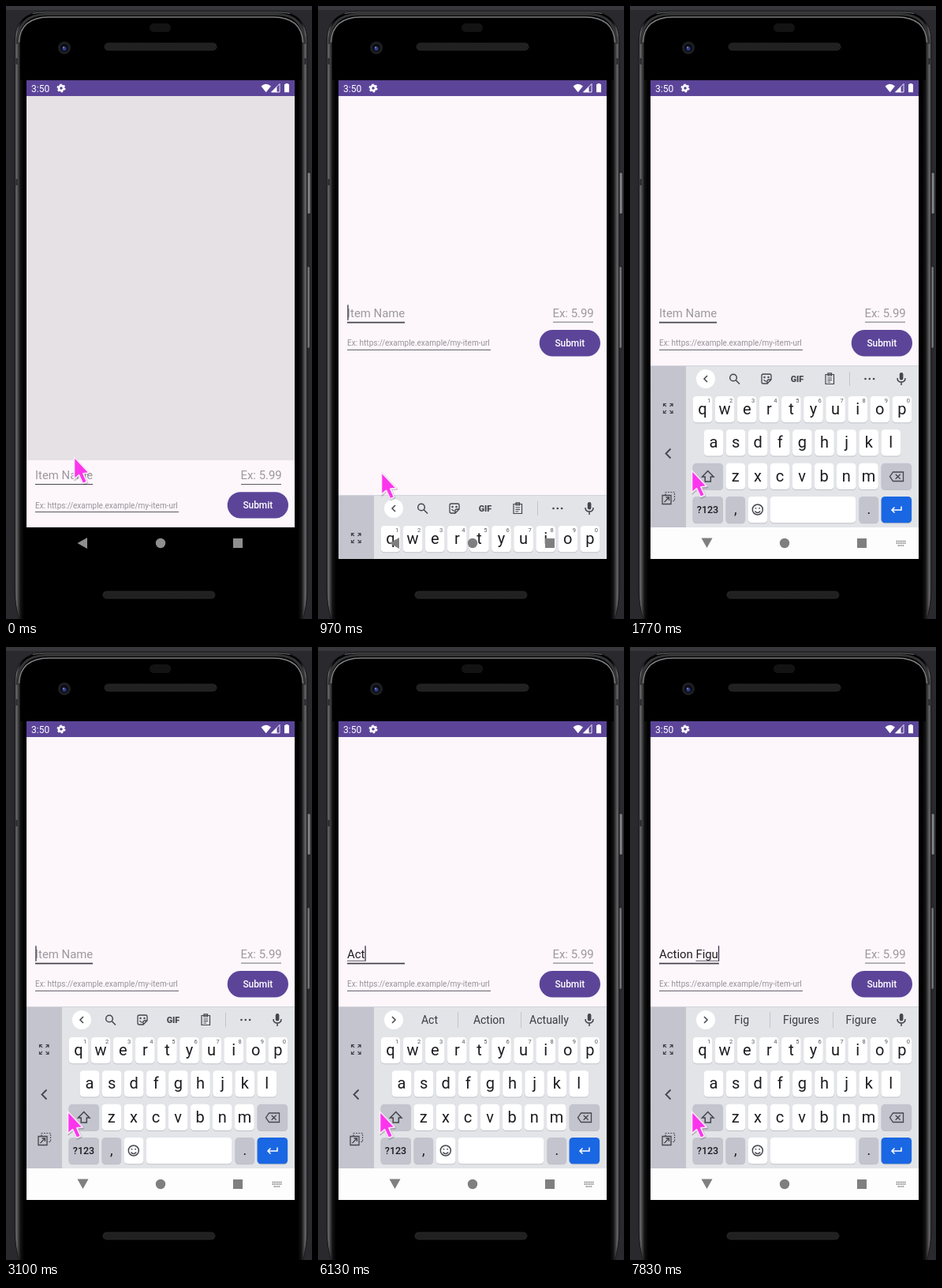
These frames come from a looping animation (388x776 px, 8000 ms). An HTML page:

```html
<!DOCTYPE html>
<html lang="en">
<head>
<meta charset="utf-8">
<title>Item form</title>
<style>
html, body { margin: 0; width: 100%; height: 100%; overflow: hidden; background: #29292e; }
svg { display: block; width: 388px; height: 776px; }
text { font-family: Roboto, sans-serif; white-space: pre; }
.line { fill: none; stroke: #44464c; stroke-width: 1.5; }
.mid { text-anchor: middle; }
</style>
</head>
<body>
<svg viewBox="0 0 388 776">
  <defs>
    <clipPath id="screen"><rect x="26" y="94" width="340" height="606"/></clipPath>
    <linearGradient id="metal" gradientUnits="userSpaceOnUse" x1="11" x2="382" y1="0" y2="0">
      <stop offset="0" stop-color="#2a2a2c"/><stop offset=".006" stop-color="#67686a"/>
      <stop offset=".013" stop-color="#3a3a3c"/><stop offset=".02" stop-color="#121213"/>
      <stop offset=".032" stop-color="#000"/><stop offset=".968" stop-color="#000"/>
      <stop offset=".98" stop-color="#121213"/><stop offset=".987" stop-color="#3a3a3c"/>
      <stop offset=".994" stop-color="#67686a"/><stop offset="1" stop-color="#2a2a2c"/>
    </linearGradient>
    <linearGradient id="button">
      <stop offset="0" stop-color="#3c3d3f"/><stop offset=".5" stop-color="#8d8e90"/><stop offset="1" stop-color="#4a4b4d"/>
    </linearGradient>
    <pattern id="mesh" width="4" height="4" patternUnits="userSpaceOnUse">
      <rect width="4" height="4" fill="#0e0e0e"/>
      <path d="M0 0L2 2L0 4M2 0L4 2L2 4" stroke="#3c3c3c" fill="none" stroke-width=".8"/>
    </pattern>
  </defs>

  <!-- phone -->
  <rect width="388" height="776" fill="#29292e"/>
  <rect width="388" height="5" fill="#37373c"/>
  <g fill="url(#button)" stroke="#1b1b1d" stroke-width=".6">
    <rect x="381" y="211" width="5.500" height="52" rx="1.500"/>
    <rect x="380" y="330" width="5.500" height="103" rx="1.500"/>
  </g>
  <path d="M11 738V44Q12 8 48 7H346Q381 8 382 44V738Q382 758 375 782H18Q11 758 11 738Z" fill="url(#metal)" stroke="#19191b"/>
  <path d="M18 50Q18 15 54 14H339Q375 15 375 50V94H18Z"/>
  <g fill="none">
    <path d="M14 48Q15 11 50 10.500H344Q378 11 379 48" stroke="#333436" stroke-width="3"/>
    <path d="M16.500 46Q18 14.500 54 14H339Q375 14.500 376.500 46" stroke="#808183" stroke-width="1.400"/>
    <path d="M34 9.500Q41 8 50 8H344Q353 8 360 9.500" stroke="#6c6d6f"/>
  </g>
  <path d="M11 66h4v8h-4zM11 219h4v8h-4zM378 66h4v8h-4z" fill="#303134"/>
  <rect x="182" y="22" width="27" height="11" rx="5.500" fill="#131314"/>
  <g fill="url(#mesh)" stroke="#2b2b2b" stroke-width=".8">
    <rect x="125" y="47" width="142" height="9" rx="4.500"/>
    <rect x="123" y="741" width="142" height="9" rx="4.500"/>
  </g>
  <circle cx="74" cy="53" r="8" fill="#1d1e22"/>
  <circle cx="74" cy="53" r="5" fill="#0c0d16"/>
  <circle cx="74" cy="54" r="2.500" fill="#2f3d86"/><circle cx="73" cy="52.500" r="1" fill="#8795d8"/>

  <g clip-path="url(#screen)">
    <rect x="26" y="94" width="340" height="606"/>
    <rect x="26" y="114" width="340" height="546" fill="#fdf7fc"/>
    <rect id="list" x="26" y="114" width="340" height="461" fill="#e6e1e5"/>
    <rect x="26" y="94" width="340" height="20" fill="#5c4599"/>
    <g fill="#fff">
      <text x="32" y="108.500" font-size="12">3:50</text>
      <circle cx="70" cy="104" r="3.100" fill="none" stroke="#fff" stroke-width="2.600"/>
      <circle cx="70" cy="104" r="4.600" fill="none" stroke="#fff" stroke-width="1.800" stroke-dasharray="2.400 2.417"/>
      <path d="M323.500 101.500Q329.700 96 336 101.500L329.700 109.300Z"/>
      <path d="M347 98.500V109H336.500Z" fill="none" stroke="#fff" stroke-width=".9"/><path d="M343.500 102V109H336.500Z"/>
      <path d="M354.500 99V98H357.500V99H359V109.300H353V99Z"/>
    </g>

    <!-- form -->
    <g id="form">
      <text id="name" x="37" y="599" font-size="14.900"></text>
      <text x="297.500" y="599" font-size="14.900" fill="#9c989e">Ex: 5.99</text>
      <text x="37" y="635.500" font-size="10.030" fill="#969298">Ex: https://example.example/my-item-url</text>
      <path id="nameLine" stroke="#49454f"/>
      <path id="priceLine" d="M298 605.500H349"/>
      <path d="M37 640.500H219" stroke="#5d5963"/>
      <path id="word" stroke="#3a373e" stroke-width=".8"/>
      <rect id="caret" y="583.500" width="1.300" height="19.500" fill="#37324a"/>
      <rect x="280.700" y="615.200" width="77.300" height="33.400" rx="16.700" fill="#5c4599"/>
      <text x="319.300" y="636.300" class="mid" font-size="11.900" font-weight="500" fill="#fff">Submit</text>
    </g>

    <!-- keyboard -->
    <g id="board">
      <rect x="26" y="455" width="340" height="205" fill="#e2e4e8"/>
      <rect x="26" y="455" width="45" height="205" fill="#c4c4cf"/>
      <rect x="26" y="660" width="340" height="40" fill="#fdfdfe"/>
      <path d="M26 455.500H366" stroke="#d3d4da"/>
      <g class="line">
        <path d="M42.500 507V503.500H46M50.500 503.500H54V507M42.500 512V515.500H46M50.500 515.500H54V512M43 504L46 507M53.500 504L50.500 507M43 515L46 512M53.500 515L50.500 512" stroke-width="1.200"/>
        <path d="M51.500 560.500L45.500 566.500L51.500 572.500" stroke-width="1.800"/>
        <path d="M41 619.500H52V630.500H41ZM43.500 628L49.500 622M45.500 622H49.500V626" stroke-width="1.300"/>
        <path d="M45 619V615.500H56.500V626.500H52" stroke-width="1.200" stroke-dasharray="1.800 1.500"/>
      </g>
      <circle cx="96" cy="472" r="12" fill="#fff"/>
      <path id="arrow" class="line" d="M98 468L94 472L98 476"/>
      <g id="tools" class="line">
        <circle cx="131" cy="470.500" r="4.300"/><path d="M134.200 473.700L139 478.500"/>
        <path d="M179 473V468Q179 466 177 466H169Q167 466 167 468V476Q167 478 169 478H174ZM179 473H176Q174 473 174 475V478M169.500 473Q171 475.500 173 475" stroke-width="1.300"/>
        <circle cx="170.500" cy="470" r=".5"/><circle cx="175.500" cy="470" r=".5"/>
        <text x="212" y="475.800" class="mid" font-size="10.800" font-weight="900" fill="#44464c" stroke="none">GIF</text>
        <path d="M248 466.500H258.500V478.500H248ZM251 466.500V464.800H255.500V468H251V466M250.500 471H256M250.500 473.500H256M250.500 476H254" stroke-width="1.200"/>
        <path d="M278.500 463V481" stroke="#c3c5ca" stroke-width="1"/>
        <path d="M298.500 472H310" stroke-width="2.600" stroke-linecap="round" stroke-dasharray="0 5.300"/>
      </g>
      <g id="tips" font-size="14" fill="#3a3c42">
        <text x="141.500" y="477" class="mid"></text>
        <text x="217" y="477" class="mid"></text>
        <text x="293" y="477" class="mid"></text>
        <path d="M177.500 462V482M257.500 462V482" stroke="#c3c5ca"/>
      </g>
      <rect x="341.800" y="464" width="4.600" height="9.500" rx="2.300" fill="#44464c"/>
      <path class="line" d="M339 471Q339 476 344 476Q349 476 349 471M344 476V480"/>
      <g id="keys"></g>
      <g class="line">
        <path d="M98.700 588.500L106 596H102.300V602H95.200V596H91.500Z"/>
        <path d="M333.500 590H346.500V601.500H333.500L329.500 595.700ZM336.700 592.800L342.700 598.800M342.700 592.800L336.700 598.800" stroke-width="1.300"/>
        <circle cx="161.800" cy="637.500" r="6.500"/><path d="M158.300 639.500Q161.800 643.500 165.300 639.500" stroke-width="1.300"/>
        <path d="M158.700 635.700H160.300M163.300 635.700H164.900" stroke-width="1.600"/>
        <path d="M344 633.500V638H332.500M335.500 634.500L332 638L335.500 641.500" stroke="#fff"/>
      </g>
    </g>

    <g id="nav">
      <path id="back" d="M-6.500 0L6 -7V7Z"/>
      <circle cx="196" cy="680" r="6.200"/>
      <rect x="288" y="674" width="12" height="12"/>
      <path id="switch" d="M337.500 677.500H349.500M337.500 680H349.500M339.500 683H347.500" stroke="#858585" stroke-width="1.300" stroke-dasharray="1.500 .6"/>
    </g>
  </g>

  <g id="pointer" stroke-linejoin="round">
    <path d="M0 0V28L6 22.700L11 33.500L16 31.200L11.300 20.700L18.700 20Z" transform="translate(.8 1.200)" opacity=".18" stroke="#000" stroke-width="2.400"/>
    <path d="M0 0V28L6 22.700L11 33.500L16 31.200L11.300 20.700L18.700 20Z" fill="#fb35ec" stroke="#fdeafb" stroke-width="1.600"/>
  </g>
</svg>
<script>
const LOOP = 8000, FOCUS = 850, RISE = 930;
const $ = id => document.getElementById(id);
const set = (el, attrs) => { for (const k in attrs) el.setAttribute(k, attrs[k]); };
const show = (el, on) => set(el, { opacity: +on });
const ramp = (t, a, b) => Math.min(1, Math.max(0, (t - a) / (b - a)));
const smooth = u => u * u * (3 - 2 * u);

function add(tag, attrs, text = '') {
  const el = document.createElementNS('http://www.w3.org/2000/svg', tag);
  set(el, attrs);
  el.textContent = text;
  $('keys').append(el);
}
function key(x, y, w, fill = '#fff') {
  add('rect', { x, y: y + 1, width: w, height: 33.3, rx: 4.5, fill: '#bfc1c8' });
  add('rect', { x, y, width: w, height: 33.3, rx: 4.5, fill });
}
function label(s, x, y, size, more) {
  add('text', { x, y, 'font-size': size, class: 'mid', fill: '#1c1c20', ...more }, s);
}
[['qwertyuiop', 92, 494], ['asdfghjkl', 106, 536.3], ['zxcvbnm', 133.8, 578.7]].forEach(([row, x0, y], r) =>
  [...row].forEach((c, i) => {
    const x = x0 + 28.1 * i;
    key(x - 12.3, y, 24.6);
    label(c, x, y + 23, 20);
    if (!r) label((i + 1) % 10, x + 8, y + 7.5, 7.5, { fill: '#55575d' });
  }));
const grey = '#c3c4ce', low = 621;
key(79.5, 578.7, 38.5, grey);
key(318.6, 578.7, 38.5, grey);
key(79.5, low, 38.5, grey);
key(121.5, low, 24.6, grey);
key(149.7, low, 24.6);
key(177.8, low, 108.5);
key(290.5, low, 24.6, grey);
key(318.6, low, 38.5, '#1a67e3');
label('?123', 98.5, 642, 12.5, { 'font-weight': 500 });
label(',', 133.8, 643, 18);
label('.', 302.8, 643, 18);

// time, text, start of the underlined word, suggestions
const typed = [
  [4110, 'A', 0, 'A And S'],
  [4970, 'Ac', 0, 'Ac Act Actually'],
  [5830, 'Act', 0, 'Act Action Actually'],
  [6210, 'Acti', 0, 'Acti Action Active'],
  [6400, 'Actio', 0, 'Actio Action Actions'],
  [6570, 'Action', 0, 'Action Actions Actively'],
  [6750, 'Action ', 7, 'and is to'],
  [7080, 'Action F', 7, 'F For From'],
  [7330, 'Action Fi', 7, 'Fi First Figure'],
  [7500, 'Action Fig', 7, 'Fig Figures Figure'],
  [7790, 'Action Figu', 7, 'Fig Figures Figure']
];
const latest = t => typed.filter(s => s[0] <= t).pop();

function width(s) {
  $('name').textContent = s;
  return s ? $('name').getComputedTextLength() : 0;
}

function drawField(t, up) {
  const [at, text, from] = latest(t) || [RISE, '', 0];
  const start = 37 + width(text.slice(0, from)), end = 37 + width(text);
  const focus = t >= FOCUS;
  if (!text) $('name').textContent = 'Item Name';
  set($('name'), { fill: text ? '#1f1c22' : focus && !up ? '#69646c' : '#9c989e' });
  set($('word'), { d: `M${start} 602.500H${end}` });
  show($('word'), end > start);
  set($('nameLine'), {
    d: `M37 ${focus ? 605.8 : 605.5}H${Math.max(110, end + 1)}`,
    'stroke-width': focus ? 1.7 : 1
  });
  set($('priceLine'), {
    stroke: focus ? '#a19da4' : '#5d5963',
    'stroke-width': focus ? 1.6 : 1
  });
  set($('caret'), { x: end + (text ? 0 : .3) });
  show($('caret'), focus && Math.floor(Math.max(0, t - at) / 500) % 2 === 0);
}

function drawBoard(t) {
  const drop = Math.round(246 * (1 - ramp(t, RISE, RISE + 270)) ** 2.48);
  set($('board'), { transform: `translate(0 ${drop})` });
  const swap = smooth(ramp(t, 4110, 4290));
  set($('arrow'), { transform: `rotate(${180 * swap} 96 472)` });
  set($('tools'), { opacity: 1 - swap });
  set($('tips'), { opacity: swap });
  const words = (latest(t - 220) || typed[0])[3].split(' ');
  [...$('tips').querySelectorAll('text')].forEach((el, i) => { el.textContent = words[i]; });
}

function draw(t) {
  const up = t >= RISE;
  show($('list'), !up);
  set($('form'), { transform: `translate(0 ${up ? -205.2 : 0})` });
  drawField(t, up);
  drawBoard(t);
  const turn = smooth(ramp(t, 1010, 1200));
  set($('nav'), { fill: up ? '#7f7f7f' : '#8f8f8f' });
  set($('back'), { transform: `translate(${97 + .5 * turn} ${680 - .5 * turn}) rotate(${-90 * turn})` });
  set($('switch'), { opacity: turn });
  const a = smooth(ramp(t, 30, 700)), b = smooth(ramp(t, 880, 1060));
  set($('pointer'), { transform: `translate(${86.5 - 4 * a - 4 * b} ${571 + 22 * a - 5 * b})` });
}

function tick() {
  draw(performance.now() % LOOP);
  requestAnimationFrame(tick);
}
tick();
</script>
</body>
</html>
```
